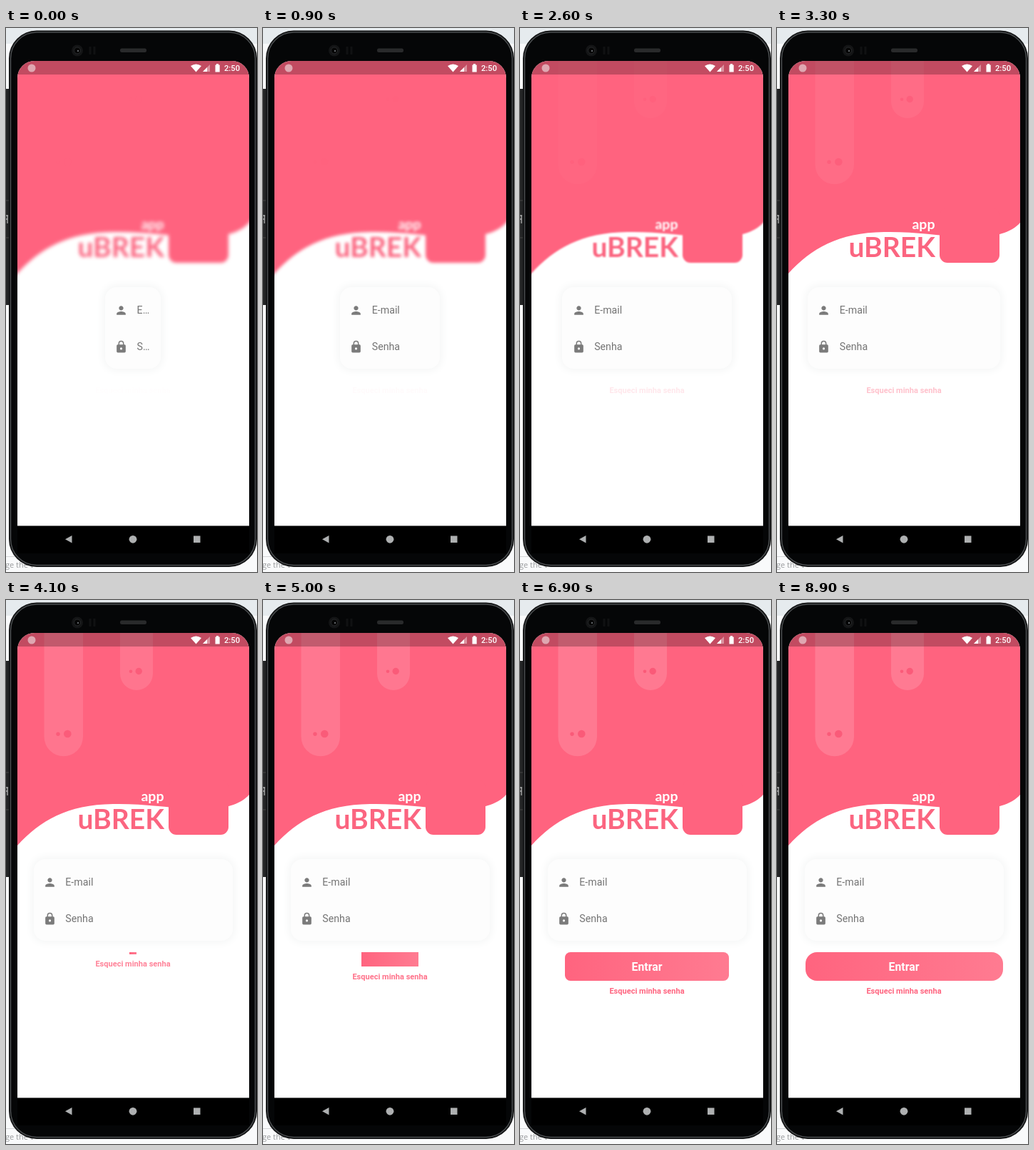
An HTML page for the animation above (9900 ms loop, 352 by 760 pixels).

```html
<!DOCTYPE html>
<html lang="pt">
<head>
<meta charset="utf-8">
<title>Login</title>
<style>
  html, body { margin: 0; width: 100%; height: 100%; overflow: hidden; background: #f9fafb; }
  body { position: relative; font-family: Roboto, sans-serif; }
  svg, div { position: absolute; }
  .stage { left: 0; top: 0; }
  #card { top: 362px; height: 114px; border-radius: 16px; background: #fdfdfd;
    box-shadow: 0 0 12px 3px #f5f6f6; }
  .row { left: 0; right: 0; height: 20px; }
  .row svg { left: 13.5px; top: .5px; width: 19px; height: 19px; fill: #7b7b7b; }
  .row div { left: 44.8px; right: 14px; font-size: 14.2px; line-height: 20px; color: #747474;
    overflow: hidden; white-space: nowrap; text-overflow: ellipsis; }
  #button { top: 492px; overflow: hidden; background: linear-gradient(90deg, #ff647f, #ff7b91); }
  #enter { left: 50%; top: 50%; transform: translate(-50%, -50%);
    font-weight: 700; font-size: 15.8px; color: #fff; }
  #forgot { left: 16px; width: 324px; text-align: center; font-weight: 700; font-size: 11.06px;
    line-height: 14px; color: #ff647f; white-space: nowrap; }
</style>
</head>
<body>
<svg class="stage" width="352" height="760" viewBox="0 0 352 760">
  <defs>
    <clipPath id="screen"><path d="M16 695.500V70a24 24 0 0 1 24-24H317a24 24 0 0 1 24 24V695.500z"/></clipPath>
  </defs>

  <!-- desktop behind the phone -->
  <path d="M0 0H352V22H0z" fill="#e6ebee"/>
  <path d="M0 85H8V387H0z" fill="#232425"/>
  <path d="M0 241H8M0 293H8" stroke="#444"/>
  <path d="M0 262H3M0 267H2M2 262V273" stroke="#ddd"/>
  <path d="M0 738.5H40" stroke="#d5d7d9"/>
  <text x="-1" y="754" font-family="Open Sans, sans-serif" font-size="11" fill="#9a9c9e">ge the v</text>

  <!-- phone -->
  <rect x="4" y="3.500" width="348" height="749.500" rx="39" fill="#101112"/>
  <rect x="6.500" y="6" width="343" height="744.500" rx="36.500" fill="#050607" stroke="#4a4d4f" stroke-width="1.500"/>
  <circle cx="100" cy="31.5" r="8" fill="#141516"/>
  <circle cx="100" cy="31.5" r="4.5" fill="#050505" stroke="#292b2d"/>
  <circle cx="101" cy="32" r="1.2" fill="#626669"/>
  <path d="M118 26V37M124 26V37" stroke="#101112" stroke-width="3"/>
  <rect x="160" y="28.5" width="37" height="5.5" rx="2.5" fill="#292a2b"/>

  <path d="M16 695H341V734H16z"/>
  <g clip-path="url(#screen)">
    <path d="M16 46H341V696H16z" fill="#fff"/>
    <g id="header">
      <path d="M0 20H360V250L341 272C328 287 302 293 268 292C230 291 195 284 150 285C86 286 48 308 16 343L0 361z" fill="#ff637f"/>
      <g font-family="Lato, sans-serif" font-weight="700" text-anchor="end">
        <text x="221.5" y="281" font-size="19.5" fill="#fff">app</text>
        <text x="222" y="320" font-size="39" fill="#fb6580">uBREK</text>
      </g>
      <rect x="228" y="251" width="84" height="77" rx="11" fill="#ff637f"/>
    </g>
    <g id="drops">
      <path d="M53.5 46H108V191a27.25 27.25 0 0 1-54.5 0z M160 46H206V103a23 23 0 0 1-46 0z" fill="#fff" fill-opacity=".15"/>
      <g fill="#fa5b79">
        <circle cx="73" cy="187.3" r="2.7"/><circle cx="86.3" cy="187" r="5.3"/>
        <circle cx="175" cy="99.7" r="2.3"/><circle cx="186.2" cy="99.5" r="4.7"/>
      </g>
    </g>
    <path d="M16 46H341V65H16z" fill-opacity=".24"/>
    <circle cx="36" cy="56" r="5.5" fill="#dfa7b1"/>
    <g fill="#fff">
      <path d="M259 53Q266.500 48 274 53L266.500 61.500z"/>
      <path d="M276 61L286 51V61z" fill-opacity=".4"/><path d="M276 61L282 55V61z"/>
      <path d="M293.500 51.500H295V50H298V51.500H299.700V61.500H293.500z"/>
      <text x="306" y="60" font-family="Roboto, sans-serif" font-weight="500" font-size="11.2">2:50</text>
    </g>
  </g>

  <g fill="#aeb0b1">
    <path d="M83 714.300L92.500 709V719.600z"/>
    <circle cx="178" cy="714.300" r="5.400"/>
    <path d="M263 709.500H272.500V719H263z"/>
  </g>
</svg>

<div id="card">
  <div class="row" style="top:22px">
    <svg viewBox="0 0 24 24"><path d="M12 12c2.210 0 4-1.790 4-4s-1.790-4-4-4-4 1.790-4 4 1.790 4 4 4zm0 2c-2.670 0-8 1.340-8 4v2h16v-2c0-2.660-5.330-4-8-4z"/></svg>
    <div>E-mail</div>
  </div>
  <div class="row" style="top:73px">
    <svg viewBox="0 0 24 24"><path d="M18 8h-1V6a5 5 0 0 0-10 0v2H6a2 2 0 0 0-2 2v10a2 2 0 0 0 2 2h12a2 2 0 0 0 2-2V10a2 2 0 0 0-2-2zm-6 9a2 2 0 1 1 0-4 2 2 0 0 1 0 4zm3.100-9H8.900V6a3.100 3.100 0 0 1 6.200 0z"/></svg>
    <div>Senha</div>
  </div>
</div>
<div id="button"><div id="enter">Entrar</div></div>
<div id="forgot">Esqueci minha senha</div>

<script>
const LOOP = 9900, STEP = 100, LAST = 8900, MIDDLE = 178;
const $ = id => document.getElementById(id);
const [header, drops, card, button, enter, forgot] =
  ['header', 'drops', 'card', 'button', 'enter', 'forgot'].map($);

const progress = (t, from, to) => Math.min(1, Math.max(0, (t - from) / (to - from)));

// Cubic-bezier easing, solved by bisection
function bezier(x1, y1, x2, y2) {
  const at = (a, b, s) => 3 * (1 - s) ** 2 * s * a + 3 * (1 - s) * s * s * b + s ** 3;
  return x => {
    let lo = 0, hi = 1;
    for (let i = 0; i < 24; i++) {
      const mid = (lo + hi) / 2;
      if (at(x1, x2, mid) < x) lo = mid; else hi = mid;
    }
    return at(y1, y2, lo);
  };
}
const ease = bezier(.25, .1, .25, 1);
const quint = bezier(.86, 0, .07, 1);

function spread(el, width) {
  el.style.left = MIDDLE - width / 2 + 'px';
  el.style.width = width + 'px';
}

function draw(t) {
  const p = progress(t, -1020, 8330);
  const blur = 2.9 * (1 - ease(p));
  header.style.filter = blur > .03 ? `blur(${blur}px)` : 'none';
  drops.style.opacity = forgot.style.opacity = quint(p);
  spread(card, Math.min(279, 380 * (1 - (1 - p) ** 2)));

  const height = 40 * progress(t, 3950, 6000);
  spread(button, 277 * progress(t, 3985, 7510));
  button.style.height = height + 'px';
  button.style.borderRadius = 16 * progress(t, 5400, 8500) + 'px';
  const fade = progress(t, 5300, 6700);
  enter.style.opacity = fade * fade * (3 - 2 * fade);
  forgot.style.top = 499.5 + height + 'px';
}

function tick() {
  const t = performance.now() % LOOP;
  draw(Math.min(LAST, Math.floor(t / STEP) * STEP));
  requestAnimationFrame(tick);
}
tick();
</script>
</body>
</html>
```
